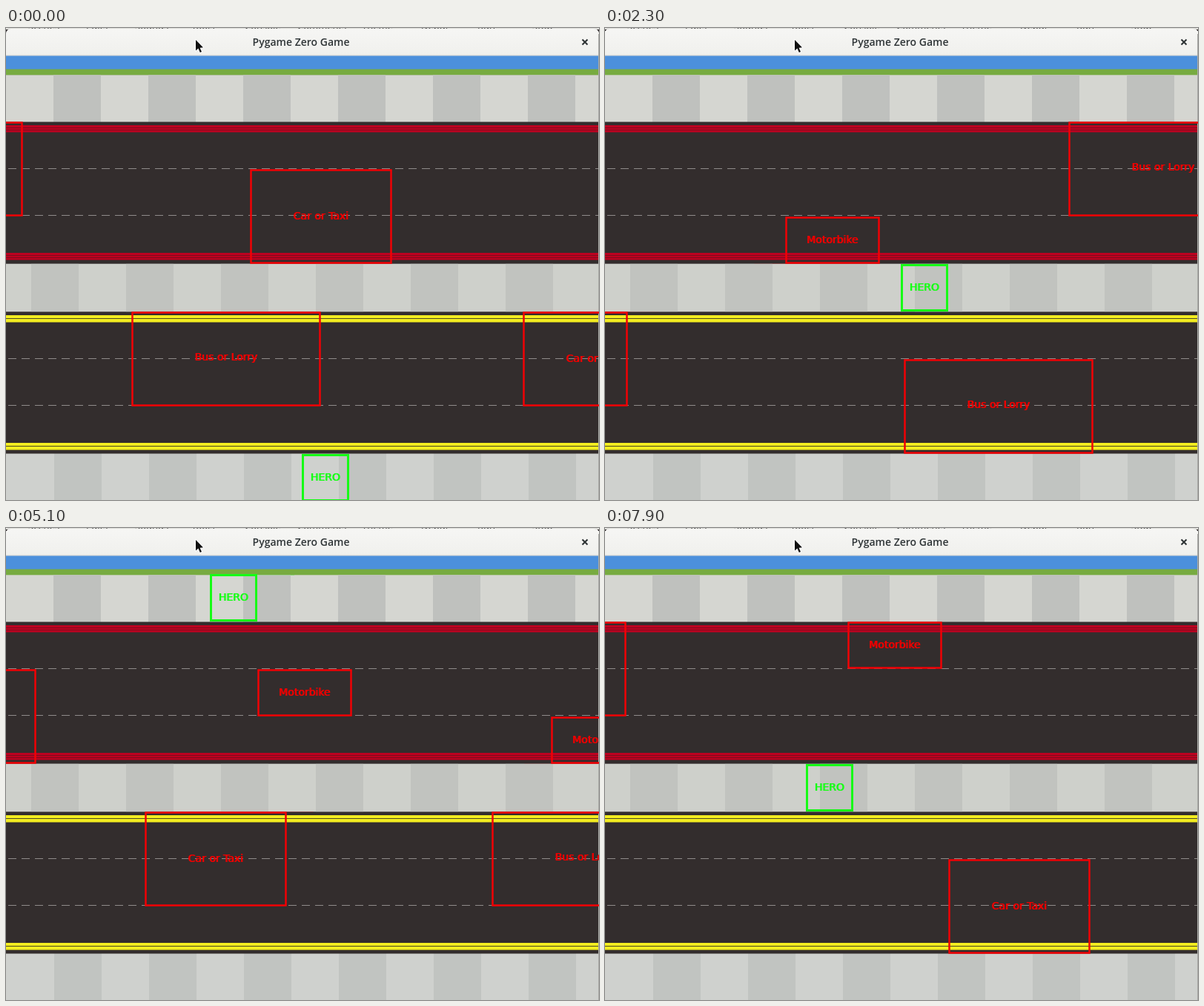
An HTML page with a canvas that plays this animation: 800x636 px, repeating every 8 s.

```html
<!DOCTYPE html>
<html lang="en">
<head>
<meta charset="utf-8">
<title>Pygame Zero Game</title>
<style>
  html, body { margin: 0; width: 100%; height: 100%; overflow: hidden; background: #332d2d; }
  canvas { display: block; width: 800px; height: 636px; }
</style>
</head>
<body>
<canvas id="stage" width="800" height="636"></canvas>
<script>
const W = 800, H = 636, LOOP = 8000, TICK = 100;
const ctx = document.getElementById('stage').getContext('2d');

// Traffic distance (px) at times (ms); all vehicles share it.
const travel = [[0, 0], [1400, 528], [3200, 1182], [4400, 1656], [5800, 2154], [7000, 2598], [7900, 2940]];

const kinds = {
  bike: { label: 'Motorbike', w: 128, h: 64, base: 36 },
  car: { label: 'Car or Taxi', w: 192, h: 128, base: 68 },
  bus: { label: 'Bus or Lorry', w: 256, h: 128, base: 66 }
};

// kind, x at the start, y, direction
const traffic = [
  ['car', 329, 190, 1], ['bus', -233, 126, 1], ['bike', -615, 254, 1], ['bike', -1173, 254, 1],
  ['bike', -1569, 190, 1], ['car', -2059, 190, 1], ['bike', -2613, 126, 1], ['bus', -3167, 126, 1],
  ['bus', 169, 382, -1], ['car', 697, 382, -1], ['bus', 1261, 446, -1], ['bike', 1741, 446, -1],
  ['car', 2095, 382, -1], ['bus', 2563, 382, -1], ['car', 3403, 446, -1]
];

// Hero hops: start time and direction, each 64 px long.
const HOP = 64, HOP_MS = 128;
const hops = [
  [1150, 'U'], [1500, 'U'], [1700, 'U'], [1900, 'U'], [2400, 'L'], [2900, 'U'],
  [3350, 'U'], [3700, 'R'], [3950, 'U'], [4400, 'U'], [4750, 'L'], [4980, 'L'],
  [5230, 'R'], [5450, 'D'], [5726, 'L'], [6600, 'D'], [7250, 'D'], [7560, 'D']
];
const dirs = { U: [0, -1], D: [0, 1], L: [-1, 0], R: [1, 0] };

function rect(x, y, w, h, color, c = ctx) {
  c.fillStyle = color;
  c.fillRect(x, y, w, h);
}

function distance(t) {
  let i = 1;
  while (i < travel.length - 1 && t > travel[i][0]) i++;
  const [t0, d0] = travel[i - 1], [t1, d1] = travel[i];
  return Math.round((d0 + (d1 - d0) * (t - t0) / (t1 - t0)) / 6) * 6;
}

function heroAt(t) {
  let x = 399, y = 574;
  for (const [start, dir] of hops) {
    const p = Math.max(0, Math.min(1, (t - start) / HOP_MS));
    x += dirs[dir][0] * HOP * p;
    y += dirs[dir][1] * HOP * p;
  }
  return [Math.round(x), Math.round(y)];
}

function pavement(c, y, first, light, dark) {
  rect(0, y, W, 65, light, c);
  for (let x = first; x < W; x += 128) rect(x, y, 64, 65, dark, c);
}

function kerbLine(c, y, color, grooves, grooveColor) {
  rect(0, y, W, 9.5, color, c);
  for (const g of grooves) rect(0, y + g, W, 1, grooveColor, c);
}

function road(c, y, color, grooves, grooveColor) {
  rect(0, y + 0.5, W, 191, '#332d2d', c);
  kerbLine(c, y + 5, color, grooves, grooveColor);
  kerbLine(c, y + 177, color, grooves, grooveColor);
  for (const lane of [63, 126])
    for (let x = 3; x < W; x += 18) rect(x, y + lane, 11, 1, '#8f8b8a', c);
}

function titleBar(c) {
  rect(0, 0, W, 2, '#dcdcd8', c);
  c.save();
  c.beginPath();
  c.rect(0, 0, W, 2);
  c.clip();
  c.font = '13px "Open Sans", sans-serif';
  c.fillStyle = '#3a3a3a';
  const menu = [[30, 'Scenes'], [108, 'Edits'], [174, 'Sounds'], [250, 'Tools'], [322, 'Console'],
    [393, 'Comments'], [480, 'Theme'], [560, 'Debug'], [636, 'Run'], [710, 'Stop']];
  for (const [x, word] of menu) c.fillText(word, x, 2);
  c.restore();

  const grad = c.createLinearGradient(0, 1, 0, 37);
  grad.addColorStop(0, '#f6f6f4');
  grad.addColorStop(1, '#f0f0ed');
  c.fillStyle = grad;
  c.beginPath();
  c.roundRect(0, 1, W, 40, [7, 7, 0, 0]);
  c.fill();
  rect(0, 36.5, W, 1, '#cfd0cb', c);

  c.font = '600 14px "Open Sans", "Noto Sans", sans-serif';
  c.textAlign = 'center';
  c.fillStyle = '#2e3436';
  c.fillText('Pygame Zero Game', 398, 24);

  c.strokeStyle = '#2e3436';
  c.lineWidth = 2.1;
  c.beginPath();
  c.moveTo(777.5, 15.5);
  c.lineTo(784.5, 22.5);
  c.moveTo(784.5, 15.5);
  c.lineTo(777.5, 22.5);
  c.stroke();
}

function pointer(c) {
  c.beginPath();
  [[256, 16], [256, 30.5], [259.4, 27.5], [261.8, 33], [264, 32], [261.6, 26.7], [266, 26.3]]
    .forEach(([x, y]) => c.lineTo(x, y));
  c.closePath();
  c.lineJoin = 'round';
  c.lineWidth = 2;
  c.strokeStyle = '#fff';
  c.stroke();
  c.fillStyle = '#111';
  c.fill();
}

function makeScene() {
  const layer = document.createElement('canvas');
  layer.width = W;
  layer.height = H;
  const c = layer.getContext('2d');
  titleBar(c);
  rect(0, 37.5, W, 18.5, '#4c90dc', c);
  rect(0, 55.5, W, 8, '#77ab40', c);
  pavement(c, 63.5, 64, '#d5d6d1', '#bfc1be');
  pavement(c, 317.5, 34, '#ced0cb', '#c1c3bf');
  pavement(c, 573, 65, '#cfd1ce', '#c1c4c1');
  road(c, 126, '#bd0220', [3, 6], '#7d0c1e');
  road(c, 382, '#f3ed20', [4], '#4f4a20');
  rect(799, 8, 1, H, '#a9a9a6', c);
  pointer(c);
  return layer;
}

function box(x, y, w, h, line, color) {
  ctx.strokeStyle = color;
  ctx.lineWidth = line;
  ctx.strokeRect(x + 1.5, y + 1.5, w - 3, h - 3);
}

// Drawn twice, one pixel apart, for a smeared bold.
function label(text, x, y, color) {
  ctx.font = '14px "DejaVu Sans", sans-serif';
  ctx.textAlign = 'center';
  ctx.fillStyle = color;
  ctx.fillText(text, x - 0.5, y);
  ctx.fillText(text, x + 0.5, y);
}

const scene = makeScene();

function draw(t) {
  ctx.drawImage(scene, 0, 0);
  const d = distance(t);
  for (const [kind, x0, y, dir] of traffic) {
    const k = kinds[kind], x = x0 + dir * d;
    if (x > W || x + k.w < 0) continue;
    box(x, y, k.w, k.h, 2.5, '#f20004');
    label(k.label, x + k.w / 2, y + k.base, '#ee0000');
  }
  const [hx, hy] = heroAt(t);
  box(hx, hy, 64, 64, 3, '#16fb16');
  label('HERO', hx + 32, hy + 36, '#16ff16');
}

const begin = performance.now();
function loop() {
  const t = (performance.now() - begin) % LOOP;
  draw(Math.floor(t / TICK) * TICK);
  requestAnimationFrame(loop);
}
loop();
</script>
</body>
</html>
```
